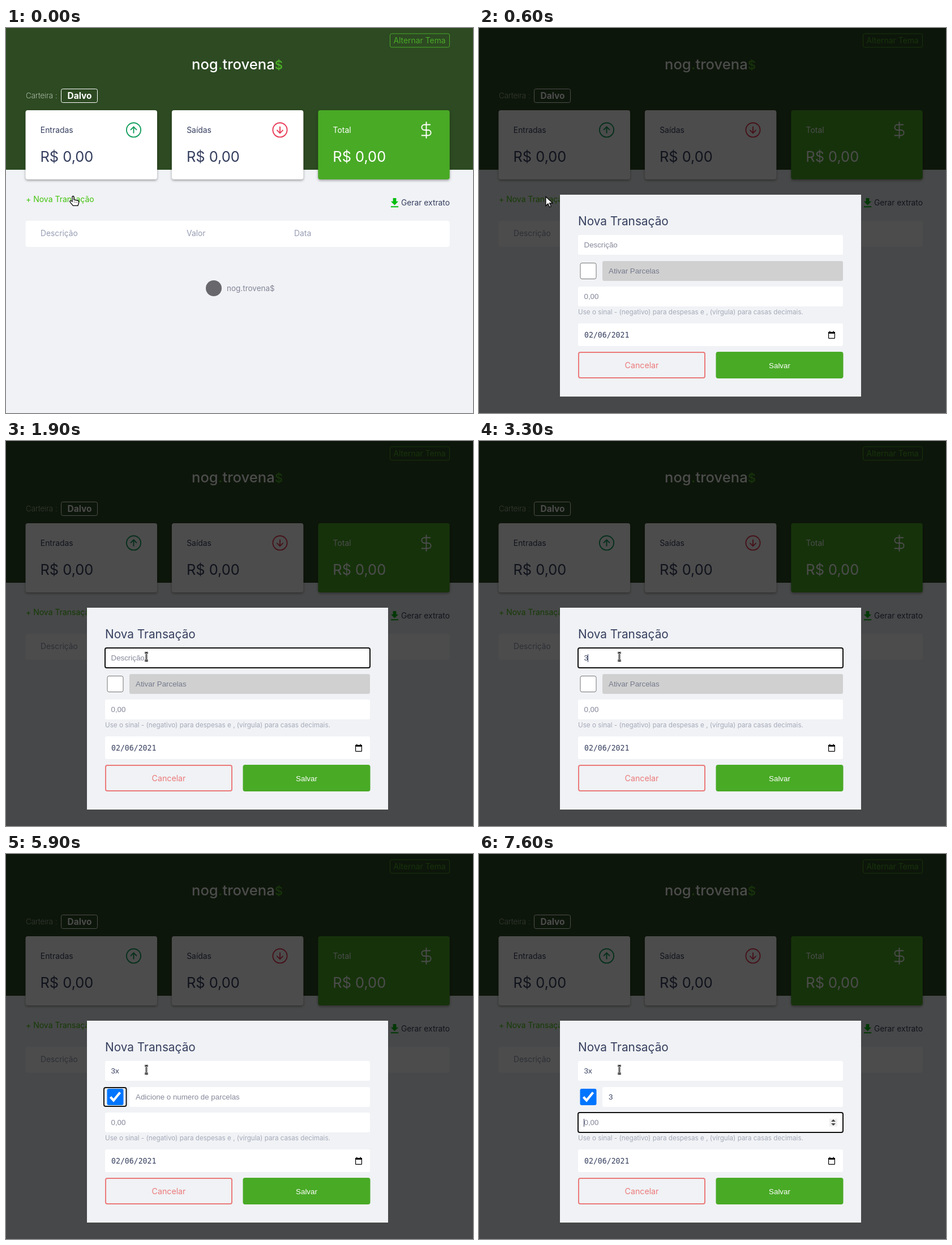
Recreate the animation shown at these times as an HTML page with a canvas. Size 825x679 px, loop 8 s.

```html
<!DOCTYPE html>
<html lang="pt-BR">
<head>
<meta charset="utf-8">
<title>Nova Transação</title>
<style>
  html, body { margin: 0; width: 100%; height: 100%; overflow: hidden; background: #f0f2f5; }
  canvas { display: block; width: 825px; height: 679px; }
</style>
</head>
<body>
<canvas id="stage" width="825" height="679"></canvas>
<script>
const ctx = document.getElementById('stage').getContext('2d');
const LOOP = 8000;
const UI = 'Inter, "Open Sans", sans-serif';
const FORM = '"Liberation Sans", Arial, sans-serif';
const MONO = '"DejaVu Sans Mono", monospace';
const C = {
  page: '#f0f2f5', head: '#2d4a22', green: '#49aa26', link: '#43c40e', ink: '#363f5f',
  muted: '#969cb3', hint: '#a6aab9', holder: '#85889a', cancel: '#ec797a'
};

const ICON = {
  up: new Path2D('M0 6V-5.5M-5.5 0L0-5.5 5.5 0'),
  down: new Path2D('M0-6V5.5M-5.5 0L0 5.5 5.5 0'),
  dollar: new Path2D('M12 1v22M17.5 5H9.5a3.5 3.5 0 0 0 0 7h5a3.5 3.5 0 0 1 0 7H5.5'),
  download: new Path2D('M19 9h-4V3H9v6H5l7 7zM5 18v2h14v-2z'),
  tick: new Path2D('M184.5 428.5L190 434.5 201.5 420.5'),
  hand: new Path2D('M-1 1q0-2 1.5-2t1.5 2v4.5l6.5 1q2 .4 2 2.5v2.5l-1.6 4.3h-8.4l-5-6q-1.5-2 .3-2.6 1.5-.2 3.2 1.4z'),
  knuckles: new Path2D('M2.5 8.5v1.5M5 8.9v1.5M7.5 9.3v1.5'),
  arrow: new Path2D('M0 0v16l4-3.8 2.6 6 2.6-1.1-2.6-5.8h5.4z'),
  beam: new Path2D('M-3-7h2l1 1 1-1h2M0-6V6M-3 7h2l1-1 1 1h2')
};

const within = (t, a, b) => t >= a && t < b;

function text(str, x, y, size, color, { font = UI, weight = 400, align = 'left' } = {}) {
  ctx.font = `${weight} ${size}px ${font}`;
  ctx.textAlign = align;
  ctx.fillStyle = color;
  ctx.fillText(str, x, y);
}

const formText = (str, x, y, color) => text(str, x, y, 13.333, color, { font: FORM });

function box(x, y, w, h, r, fill, stroke, line = 1) {
  ctx.beginPath();
  ctx.roundRect(x, y, w, h, r);
  if (fill) { ctx.fillStyle = fill; ctx.fill(); }
  if (stroke) { ctx.strokeStyle = stroke; ctx.lineWidth = line; ctx.stroke(); }
}

function disc(x, y, r) {
  ctx.beginPath();
  ctx.arc(x, y, r, 0, Math.PI * 2);
}

function at(x, y, scale, paint) {
  ctx.save();
  ctx.translate(x, y);
  ctx.scale(scale, scale);
  paint();
  ctx.restore();
}

function stroke(path, color, width) {
  ctx.strokeStyle = color;
  ctx.lineWidth = width;
  ctx.stroke(path);
}

function fill(path, color) {
  ctx.fillStyle = color;
  ctx.fill(path);
}

function roundArrow(x, path, color) {
  at(x, 179.8, 1, () => {
    disc(0, 0, 12.6);
    ctx.strokeStyle = color;
    ctx.lineWidth = 1.9;
    ctx.stroke();
    stroke(path, color, 1.9);
  });
}

function card(column, label, bg, color) {
  const x = 34.5 + 258.4 * column;
  ctx.save();
  ctx.shadowColor = 'rgba(0,0,0,.35)';
  ctx.shadowBlur = 4;
  ctx.shadowOffsetY = 2;
  box(x, 145, 232.5, 122, 4, bg);
  ctx.restore();
  text(label, x + 26.3, 185, 13.9, color);
  text('R$ 0,00', x + 26, 236, 25.4, color);
}

function logo() {
  const parts = [
    ['nog', '#fff', 25.6, 500], ['.', C.green, 25.6, 500],
    ['trovena', '#fff', 25.6, 500], ['$', C.green, 22, 600]
  ];
  let x = 328;
  for (const [str, color, size, weight] of parts) {
    text(str, x, 73, size, color, { weight });
    x += ctx.measureText(str).width;
  }
}

function page() {
  ctx.fillStyle = C.page;
  ctx.fillRect(0, 0, 825, 679);
  ctx.fillStyle = C.head;
  ctx.fillRect(0, 0, 825, 250);

  box(678.5, 10, 105, 24, 3, null, C.green);
  text('Alternar Tema', 730.5, 26.5, 13.9, C.green, { align: 'center' });
  logo();
  text('Carteira :', 35, 123.5, 13.5, '#e6eae4', { weight: 200 });
  box(97.5, 107.5, 64, 24, 3, null, '#fff');
  text('Dalvo', 130, 125, 15.5, '#fff', { weight: 700, align: 'center' });

  card(0, 'Entradas', '#fff', C.ink);
  card(1, 'Saídas', '#fff', C.ink);
  card(2, 'Total', C.green, '#fff');
  roundArrow(225.5, ICON.up, '#129e5c');
  roundArrow(484, ICON.down, '#e83a56');
  at(726.3, 163.8, 1.35, () => stroke(ICON.dollar, '#fff', 1.4));

  text('+ Nova Transação', 35, 307, 14, C.link);
  at(675.1, 297.2, 0.95, () => fill(ICON.download, '#04bd10'));
  text('Gerar extrato', 784, 313, 13.8, C.ink, { align: 'right' });

  box(34.5, 340, 749.3, 46, 4, '#fff');
  text('Descrição', 61, 367, 13.8, C.muted);
  text('Valor', 319, 367, 13.9, C.muted);
  text('Data', 509, 367, 13.9, C.muted);

  disc(367, 459, 14);
  ctx.fillStyle = '#67676c';
  ctx.fill();
  text('nog.trovena$', 390, 463.5, 13.5, '#858698');
}

function ring(x, y, w, h) {
  box(x + 1.5, y + 1.5, w - 3, h - 3, 2, null, '#fff');
  box(x, y, w, h, 3, null, '#101010', 2);
}

function caret(x, y) {
  ctx.fillStyle = C.ink;
  ctx.fillRect(x, y, 1, 14);
}

function triangle(x, y, dir) {
  ctx.beginPath();
  ctx.moveTo(x - 4, y);
  ctx.lineTo(x + 4, y);
  ctx.lineTo(x, y + 4 * dir);
  ctx.fillStyle = '#454545';
  ctx.fill();
}

function spinner(y) {
  ctx.fillStyle = '#efefef';
  ctx.fillRect(619, y - 7, 14, 14);
  triangle(626, y - 1.5, -1);
  triangle(626, y + 1.5, 1);
}

function calendar() {
  ctx.fillStyle = '#000';
  ctx.fillRect(617, 536, 12, 3);
  ctx.fillRect(619, 534.5, 1.5, 2);
  ctx.fillRect(625.5, 534.5, 1.5, 2);
  box(617.6, 536.6, 10.8, 10.8, 1, null, '#000', 1.2);
}

function descriptionField(t) {
  box(175, 365, 468, 35, 3, '#fff');
  if (within(t, 1300, 5000)) ring(175, 365, 468, 35);
  if (t < 3300) formText('Descrição', 185.5, 387, C.holder);
  else formText(t < 4100 ? '3' : '3x', 185.5, 387, C.ink);
  if (within(t, 1400, 1900) || within(t, 2600, 3200)) caret(185, 376);
  if (within(t, 3300, 3900)) caret(192, 376);
  if (within(t, 4100, 4700)) caret(198, 376);
}

function checkbox(t) {
  if (within(t, 5000, 6400)) ring(173, 412, 39.5, 33);
  if (t >= 5900) {
    box(178.5, 414, 29, 29, 3, '#0075ff');
    stroke(ICON.tick, '#fff', 4.2);
  } else {
    const pressed = t >= 5700;
    box(179, 414.5, 28, 28, 3, pressed ? '#f4f4f4' : '#fff', pressed ? '#9a9a9a' : '#767676');
  }
}

function installmentsField(t) {
  const active = t >= 5900;
  box(218, 411, 425, 35, 3, active ? '#fff' : '#d0d0d0');
  if (within(t, 6400, 7600)) {
    ring(218, 411, 425, 35);
    spinner(428.5);
  }
  if (!active) formText('Ativar Parcelas', 229, 433, '#757a8c');
  else if (t < 7200) formText('Adicione o numero de parcelas', 229, 433, C.holder);
  else formText('3', 229, 433, C.ink);
  if (within(t, 6400, 7000)) caret(229, 421.5);
  if (within(t, 7200, 7600)) caret(236, 421.5);
}

function valueField(t) {
  box(175, 456, 468, 35, 3, '#fff');
  formText('0,00', 185.5, 478, C.holder);
  if (t >= 7600) {
    ring(175, 456, 468, 35);
    spinner(473.5);
    caret(185, 467);
  }
}

function modal(t) {
  ctx.fillStyle = 'rgba(0,0,0,.7)';
  ctx.fillRect(0, 0, 825, 679);
  ctx.fillStyle = C.page;
  ctx.fillRect(143, 294, 532, 356);
  text('Nova Transação', 175, 348, 20.8, C.ink);

  descriptionField(t);
  installmentsField(t);
  checkbox(t);
  valueField(t);
  text('Use o sinal - (negativo) para despesas e , (vírgula) para casas decimais.', 175, 505, 11.7, C.hint);

  box(175, 521, 468, 40, 3, '#fff');
  text('02/06/2021', 186, 545.5, 13.2, C.ink, { font: MONO });
  calendar();

  box(176, 572, 223, 45, 3, null, C.cancel, 2);
  text('Cancelar', 287.5, 599.5, 14.2, C.cancel, { align: 'center' });
  box(418.5, 571, 225, 47, 4, C.green);
  text('Salvar', 531, 599.5, 13.333, '#fff', { font: FORM, align: 'center' });
}

function cursor(t) {
  // The pointer is sampled every 100 ms on its way to the first field.
  const k = Math.min(Math.max(Math.floor((t - 600) / 100) / 5, 0), 1);
  const ease = k * k * (3 - 2 * k);
  const x = 118 + 130 * ease;
  const y = 297.5 + 83 * ease;
  at(x, y, 1, () => {
    if (t < 500) {
      fill(ICON.hand, '#fff');
      stroke(ICON.hand, '#000', 1.3);
      stroke(ICON.knuckles, '#000', 0.8);
    } else if (y < 365) {
      fill(ICON.arrow, '#fff');
      stroke(ICON.arrow, '#000', 1.2);
    } else {
      stroke(ICON.beam, '#000', 2.8);
      stroke(ICON.beam, '#fff', 0.9);
    }
  });
}

function draw() {
  const t = performance.now() % LOOP;
  page();
  if (t >= 600) modal(t);
  cursor(t);
  requestAnimationFrame(draw);
}
draw();
</script>
</body>
</html>
```
